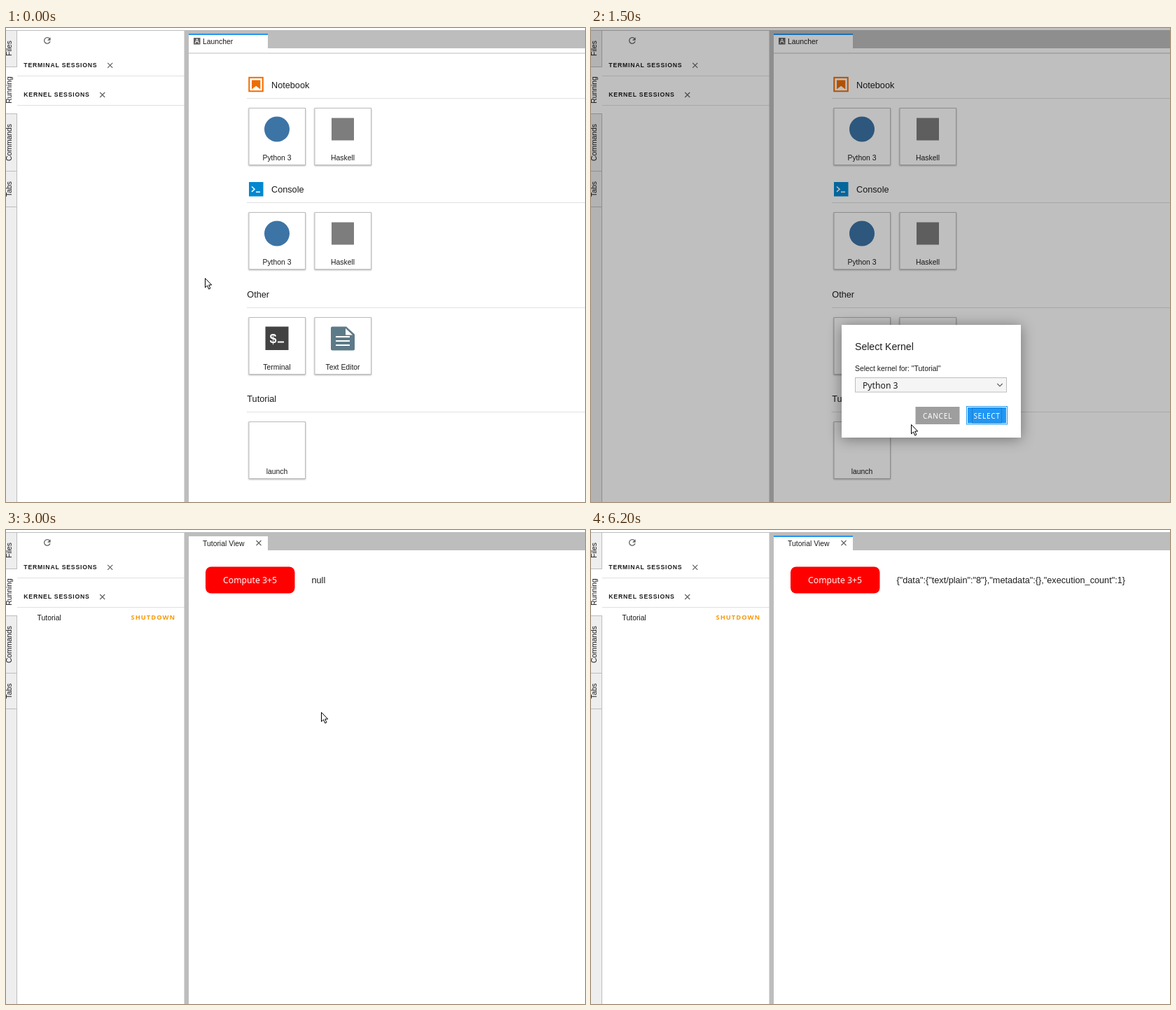
These frames come from a looping animation (827 by 677 pixels, 6.3 s). An HTML page:

```html
<!DOCTYPE html>
<html lang="en">
<head>
<meta charset="utf-8">
<title>Launcher demo</title>
<style>
  html, body { margin: 0; width: 100%; height: 100%; overflow: hidden; background: #fff; }
  svg { display: block; width: 100%; height: 100%; }
  text { font: 10.4px "Liberation Sans", Arial, sans-serif; fill: #1c1c1c; white-space: pre; }
  .head { font-size: 12.7px; }
  .title { font-size: 14.1px; }
  .caps { font-size: 8.7px; font-weight: bold; letter-spacing: .8px; }
  .ui { font: 12.2px "Noto Sans", "Open Sans", sans-serif; }
  .btn { font: 10px "Noto Sans", "Open Sans", sans-serif; letter-spacing: .75px; fill: #fff; }
  .stop { font: bold 9.3px "Noto Sans", "Open Sans", sans-serif; letter-spacing: 1px; fill: #f79a0c; }
  .white { fill: #fff; }
  .mid { text-anchor: middle; }
  .end { text-anchor: end; }
  .card { fill: #fff; stroke: #bdbdbd; filter: drop-shadow(0 1px 1px rgba(0,0,0,.3)); }
  .card.hover { filter: drop-shadow(0 2px 4px rgba(0,0,0,.45)); }
  .dialog { fill: #fff; filter: drop-shadow(0 2px 10px rgba(0,0,0,.4)); }
  .line { fill: none; stroke: #616161; stroke-width: 1.2; }
</style>
</head>
<body>
<svg id="stage" viewBox="0 0 827 677" preserveAspectRatio="none"></svg>
<script>
const LOOP = 6300;
const GREY = '#bdbdbd', RULE = '#e0e0e0', BLUE = '#2196f3';

const rect = (x, y, w, h, fill, extra = '') =>
  `<rect x="${x}" y="${y}" width="${w}" height="${h}" fill="${fill}" ${extra}/>`;
const text = (x, y, s, cls = '', extra = '') =>
  `<text x="${x}" y="${y}" class="${cls}" ${extra}>${s}</text>`;
const path = (d, extra = 'class="line"') => `<path d="${d}" ${extra}/>`;
const group = (id, body) => `<g id="${id}">${body}</g>`;
const cross = (x, y) => path(`M${x - 3.5} ${y - 3.5}l7 7m0-7l-7 7`);

function sidebar() {
  const tabs = [['Files', 4, 55, 29], ['Running', 55, 122, 88.5],
                ['Commands', 122, 204, 163.5], ['Tabs', 204, 255, 230]];
  let out = rect(0, 4, 15, 673, '#eee') + rect(15, 4, 1, 673, GREY);
  for (const [name, top, bottom, mid] of tabs) {
    if (name === 'Running') out += rect(0, top, 16, bottom - top, '#fff');
    out += rect(0, bottom, 16, 1, GREY);
    out += text(0, 0, name, 'mid', `transform="translate(8 ${mid}) rotate(-90)"`);
  }
  return out + rect(0, 55, 16, 1, GREY);
}

function panel() {
  return group('refreshHover', rect(18, 6, 81, 24, '#eee')) +
    path('M62.3 15.2A4.3 4.3 0 1 0 63 19.3', 'fill="none" stroke="#616161" stroke-width="1.3"') +
    path('M63.6 13.2v4.6h-4.6z', 'fill="#616161"') +
    text(25.3, 56, 'TERMINAL SESSIONS', 'caps') + cross(148.7, 53.3) +
    rect(16, 68, 239, 1, RULE) +
    text(25.3, 98, 'KERNEL SESSIONS', 'caps') + cross(137.7, 95.5) +
    rect(16, 110, 239, 1, RULE);
}

function frame() {
  return rect(0, 3, 827, 1, GREY) + sidebar() + panel() +
    rect(254.5, 4, 6.5, 673, GREY) + rect(261, 4, 566, 25, GREY) +
    rect(261, 9, 113, 20, '#fff') + group('tabMark', rect(261, 8, 113, 2, BLUE));
}

const icons = {
  python: (x, y) => `<circle cx="${x}" cy="${y}" r="18" fill="#3c74a6"/>`,
  haskell: (x, y) => rect(x - 16, y - 16, 32, 32, '#7d7d7d'),
  terminal: (x, y) => rect(x - 16.5, y - 17, 33, 33.5, '#424242') +
    text(x - 10.5, y + 6, '$', 'white', 'style="font-size:18px;font-weight:bold"') +
    rect(x + 1, y + 4, 9, 2, '#fff'),
  editor: (x, y) => path(`M${x - 15} ${y - 17}h20l12 11v21q0 2-2 2h-30q-2 0-2-2v-30q0-2 2-2z`, 'fill="#5d7a88"') +
    path(`M${x + 4} ${y - 14.5}v9.500h10z`, 'fill="#fff"') +
    [-2.5, 3.5, 9.5].map((d, i) => rect(x - 10, y + d - 1, i < 2 ? 20 : 20, 2, '#fff')).join(''),
  none: () => ''
};

function card(col, top, icon, label) {
  const x = 347 + col * 94, mid = x + 40;
  return rect(x, top, 80.5, 81, '#fff', `class="card" ${label === 'launch' ? 'id="launch"' : ''}`) +
    icons[icon](mid, top + 30) + text(mid, top + 74.5, label, 'mid');
}

function launcher() {
  const kernels = [['python', 'Python 3'], ['haskell', 'Haskell']];
  const sections = [
    ['Notebook', 379, kernels], ['Console', 379, kernels],
    ['Other', 344.3, [['terminal', 'Terminal'], ['editor', 'Text Editor']]],
    ['Tutorial', 344.3, [['none', 'launch']]]
  ];
  let out = rect(261, 35.500, 566, 1, GREY) +
    rect(268, 14, 9.5, 9.5, '#616161') +
    path('M270 22l2.800-6.500 2.800 6.500M271 19.500h3.600', 'fill="none" stroke="#fff"') +
    text(281, 23.3, 'Launcher');
  sections.forEach(([name, x, cards], i) => {
    const dy = Math.round(i * 149.4);
    out += text(x, 86 + dy, name, 'head') + rect(344, 100 + dy, 483, 1, RULE);
    cards.forEach(([icon, label], col) => { out += card(col, 114.5 + dy, icon, label); });
  });
  out += rect(347.3, 70.800, 19.500, 19.500, 'none', 'stroke="#ef6c00" stroke-width="2"') +
    path('M351 74.500h12.300v13l-6.150-4.800-6.150 4.800z', 'fill="#ef6c00"') +
    rect(347, 220, 20.500, 20.500, '#0288d1') +
    path('M351 226.500l4 3.700-4 3.700M357 234.300h6', 'fill="none" stroke="#fff" stroke-width="1.500"');
  return out;
}

function dialog() {
  return rect(0, 0, 827, 677, '#000', 'opacity=".25"') +
    rect(358, 424, 256, 161, '#fff', 'class="dialog"') +
    text(377, 460.3, 'Select Kernel', 'title') +
    text(377, 490.2, 'Select kernel for: "Tutorial"') +
    rect(377.5, 499.5, 216, 20.5, '#f5f5f5', `stroke="${GREY}"`) +
    text(388, 514.6, 'Python 3', 'ui') +
    path('M580.300 508l3.700 3.700 3.700-3.700') +
    rect(463.5, 541, 63, 25, '#9e9e9e') + text(495, 557.600, 'CANCEL', 'btn mid') +
    rect(536.5, 540.5, 58, 25.500, '#fff', `stroke="${BLUE}"`) +
    rect(538, 542, 55, 22.500, BLUE) +
    rect(544.5, 542.5, 42, 21.500, 'none', 'stroke="#1769aa" stroke-dasharray="1 1"') +
    text(565.500, 557.600, 'SELECT', 'btn mid');
}

function tutorial() {
  return text(281, 23.3, 'Tutorial View') + cross(361, 18.5) +
    text(44.5, 128.500, 'Tutorial') + text(242, 127.500, 'SHUTDOWN', 'stop end') +
    rect(285, 52.500, 127.500, 38, '#f00', 'rx="8"') +
    text(348.5, 76.300, 'Compute 3+5', 'ui white mid') +
    text(436.5, 76.300, 'null', 'head', 'id="output"');
}

const stage = document.getElementById('stage');
stage.innerHTML = frame() + group('launcher', launcher()) + group('tutorial', tutorial()) +
  group('dialog', dialog()) +
  group('pointer', path('M.5 .5v13.200l3-2.800 2.200 5 2.200-1-2.200-4.900h4z',
    'fill="#fff" stroke="#000" stroke-width="1"'));

// pointer holds: time, x, y
const moves = [
  [0, 284, 357], [100, 288, 366], [200, 302, 404], [300, 325, 468],
  [400, 348, 530], [500, 363, 572], [600, 369, 588],
  [1300, 378, 587], [1400, 410, 578], [1500, 457, 566], [1600, 505, 555],
  [1700, 545, 548], [1800, 566, 549], [1900, 573, 552],
  [3000, 450, 260], [3100, 367, 67], [3300, 365, 67], [4600, 365, 71],
  [4800, 365, 150], [4900, 365, 208], [5100, 365, 217], [5500, 122, 152],
  [5700, 75, 62], [5800, 56, 17], [6000, 53, -11], [6200, 53, -40]
];
const result = '{"data":{"text/plain":"8"},"metadata":{},"execution_count":1}';

const el = id => document.getElementById(id);
const show = (id, on) => { el(id).style.display = on ? '' : 'none'; };

function draw(t) {
  const [, x, y] = moves.findLast(m => m[0] <= t);
  el('pointer').setAttribute('transform', `translate(${x} ${y})`);
  show('launcher', t < 2200);
  show('dialog', t >= 1000 && t < 2200);
  show('tutorial', t >= 2200);
  show('tabMark', t < 2200 || t >= 3800);
  show('refreshHover', t >= 5800 && t < 6000);
  el('launch').classList.toggle('hover', t < 1000 && y > 562);
  el('output').textContent = t < 4500 ? 'null' : result;
}

const start = performance.now();
function tick() {
  draw((performance.now() - start) % LOOP);
  requestAnimationFrame(tick);
}
tick();
</script>
</body>
</html>
```
